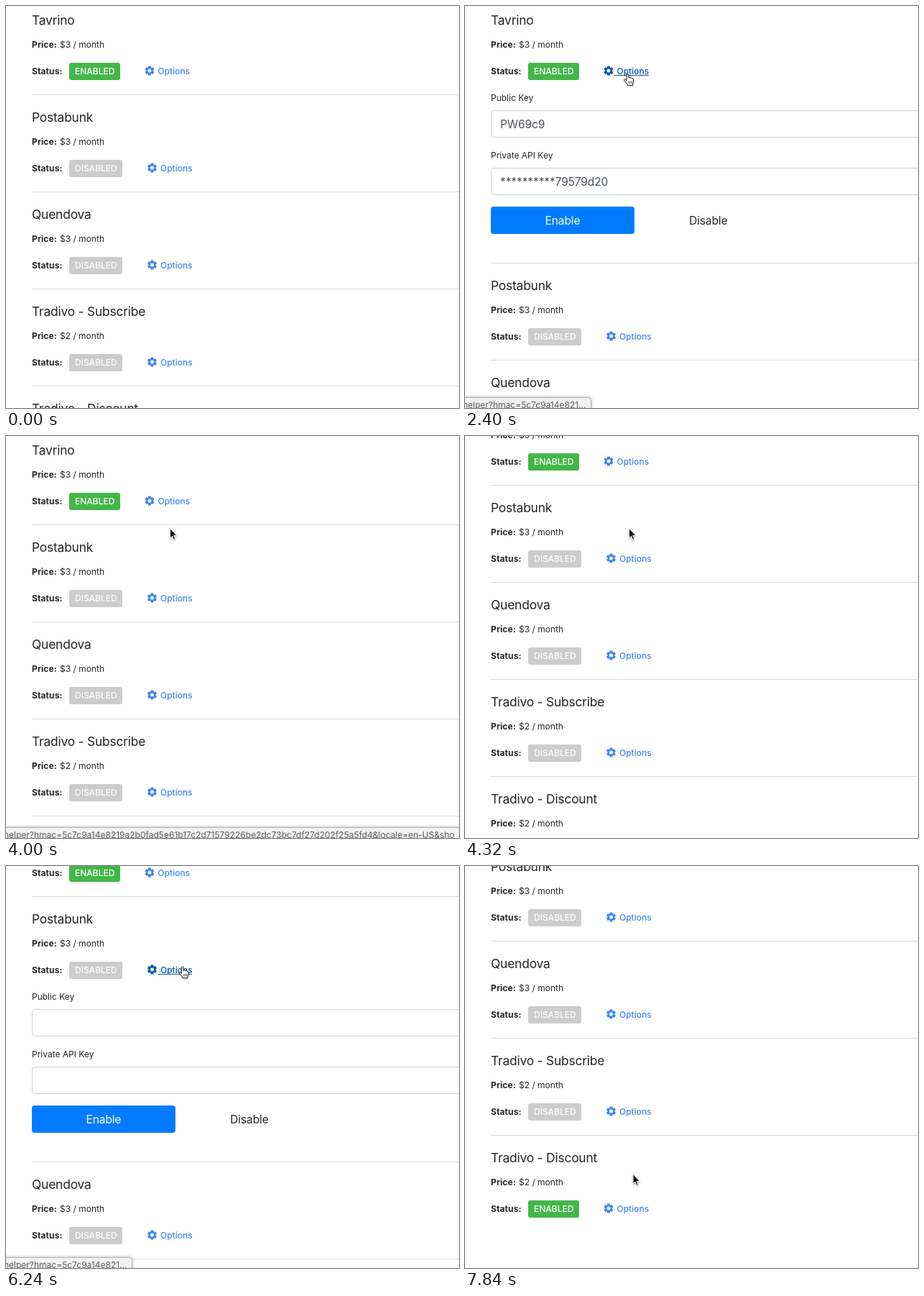
An HTML page that plays this animation: 631 by 559 pixels, repeating every 8 s.

```html
<!DOCTYPE html>
<html lang="en">
<head>
<meta charset="utf-8">
<style>
  html, body { margin: 0; width: 100%; height: 100%; overflow: hidden; background: #fff; }
  svg { display: block; width: 631px; height: 559px; font: 12px Inter, sans-serif; fill: #212529; }
  .title { font-size: 17.4px; letter-spacing: -.2px; }
  .bold { font-weight: 700; letter-spacing: .1px; }
  .badge { font-weight: 500; fill: #fff; }
  .link { font-weight: 500; fill: #4285f4; }
  .link.hover { fill: #0056b3; }
  .field { fill: #fff; stroke: #ced0d4; }
  .big { font-size: 15.5px; letter-spacing: -.1px; }
  .value { fill: #495057; }
  .url { fill: #5a5c5f; }
</style>
</head>
<body>
<svg id="stage" viewBox="0 0 631 559"></svg>
<script>
const LOOP = 8000, STEP = 160, ROW = 135, PANEL = 234;
const stage = document.getElementById('stage');

const rows = [
  { name: 'Tavrino', price: 3, on: true, keys: ['PW69c9', '**********79579d20'] },
  { name: 'Postabunk', price: 3, keys: ['', ''] },
  { name: 'Quendova', price: 3 },
  { name: 'Tradivo - Subscribe', price: 2 },
  { name: 'Tradivo - Discount', price: 2, on: true }
];
const url = 'helper?hmac=5c7c9a14e8219a2b0fad5e61b17c2d71579226be2dc73bc7df27d202f25a5fd4&locale=en-US&sho';

// Each track holds [start time, value...] and keeps a value until the next one.
const tracks = {
  cursor: [
    [0, ''], [160, 'arrow', 347, 379], [320, 'arrow', 327, 305.5], [640, 'arrow', 298, 243],
    [800, 'arrow', 250, 150], [960, 'arrow', 222, 100], [1280, 'hand', 221, 97],
    [1600, 'hand', 219.5, 95], [2240, 'hand', 221, 93.5], [3840, 'arrow', 228, 114],
    [4000, 'arrow', 228.5, 128.5], [4640, 'arrow', 228, 141], [4800, 'arrow', 228.5, 153],
    [5280, 'hand', 225.5, 149], [6080, 'hand', 205, 146], [6240, 'hand', 240.5, 139],
    [6400, 'hand', 235.5, 142], [7200, 'arrow', 240, 143], [7680, 'arrow', 238, 300],
    [7840, 'arrow', 234, 428.5]
  ],
  click: [[0, false], [2240, true], [2400, false], [3520, true], [3680, false],
          [5440, true], [5600, false], [6720, true], [6880, false]],
  hover: [[0, -1], [1920, 0], [3840, -1], [5280, 1], [7200, -1]],
  open: [[0, -1], [2400, 0], [3680, -1], [5600, 1], [6880, -1]],
  scroll: [[0, 0], [4160, 14], [4320, 55], [4480, 81], [7200, 118], [7360, 154]],
  status: [[0, ''], [2080, 'short'], [3680, 'long'], [4320, ''],
           [5600, 'short'], [6880, 'long'], [7680, '']]
};
const at = (track, t) => tracks[track].findLast(key => key[0] <= t).slice(1);

const text = (x, y, content, cls = '', extra = '') =>
  `<text x="${x}" y="${y}" class="${cls}" ${extra}>${content}</text>`;
const rect = (x, y, w, h, extra) =>
  `<rect x="${x}" y="${y}" width="${w}" height="${h}" ${extra}/>`;

function gear(x, y) {
  const teeth = [0, 60, 120].map(a => rect(-2, -6.5, 4, 13, `rx=".6" transform="rotate(${a})"`));
  return `<g transform="translate(${x} ${y})">${teeth.join('')}
    <circle r="4.9"/><circle r="2.5" fill="#fff"/></g>`;
}

function field(y, label, value) {
  return text(36, y, label) + rect(36.5, y + 13.5, 640, 37, 'rx="4" class="field"') +
    text(49, y + 38, value, 'big value');
}

function panel([publicKey, privateKey]) {
  return field(132, 'Public Key', publicKey) + field(212, 'Private API Key', privateKey) +
    rect(36, 279, 200, 38, 'rx="4" fill="#007bff"') +
    text(136, 304, 'Enable', 'big', 'text-anchor="middle" fill="#fff"') +
    text(339, 304, 'Disable', 'big', 'text-anchor="middle"');
}

function row({ name, price, on, keys }, y, open, hover, last) {
  const x = on ? 200 : 203.5, end = on ? 256 : 259;
  return `<g transform="translate(0 ${y})">` +
    text(36, 26, name, 'title') +
    text(36, 58, 'Price:', 'bold') + text(75, 58, `$${price} / month`) +
    text(36, 95, 'Status:', 'bold') +
    rect(88, 79, on ? 71 : 74, 24, `rx="3" fill="${on ? '#44b649' : '#ccc'}"`) +
    text(96, 95, on ? 'ENABLED' : 'DISABLED', 'badge') +
    `<g class="link ${hover ? 'hover' : ''}">` + gear(x, 90) + text(x + 11.5, 95, 'Options') +
    (hover ? rect(x + 8, 96, end - x - 8, 1, '') : '') + '</g>' +
    (open ? panel(keys) : '') +
    (last ? '' : rect(36, 123 + (open ? PANEL : 0), 595, 1, 'fill="#d9d9d9"')) + '</g>';
}

function statusBar(mode) {
  if (!mode) return '';
  const short = mode === 'short';
  return rect(-5.5, 544.5, short ? 181 : 650, 30,
    'rx="4" fill="#f2f2f2" stroke="#b4b4b4" style="filter:drop-shadow(0 0 2px #0005)"') +
    text(-3, 558.5, short ? url.slice(0, 24) + '...' : url, 'url');
}

const shapes = {
  '': '',
  arrow: `<path d="M0 0V13.5L3.1 10.7 5.2 15.8 7.4 14.8 5.3 9.9H9.5Z" fill="#111" stroke="#fff"
    style="filter:drop-shadow(0 1px 1px #0006)"/>`,
  hand: `<path d="M4 10.5V2.2a1.4 1.4 0 0 1 2.8 0V6.5q1.3-1 2.5.2q1.4-.7 2.3.5q1.9-.3 1.9 1.6v3
    q0 1.5-1 3v2H5.5v-1.5Q3 13.5 1 10q-.8-1.6.6-1.8q1.2 0 2.4 2.3z" fill="#fff" stroke="#222"
    style="filter:drop-shadow(0 1px 1px #0004)"/>
    <path d="M7.3 11v3.5M9.3 11v3.5M11.3 11v3.5" stroke="#222" stroke-width=".8"/>`
};

function draw(t) {
  const [shape, x = 0, y = 0] = at('cursor', t);
  const [open] = at('open', t), [hover] = at('hover', t), [scroll] = at('scroll', t);
  const list = rows.map((item, i) => row(item,
    i * ROW - scroll + (open >= 0 && i > open ? PANEL : 0),
    i === open, i === hover, i === rows.length - 1));
  const ring = at('click', t)[0]
    ? '<circle cx="7.5" cy="8" r="16.5" fill="#fff" fill-opacity=".6" stroke="#111"/>' : '';
  stage.innerHTML = list.join('') + statusBar(at('status', t)[0]) +
    `<g transform="translate(${x} ${y})">${ring}${shapes[shape]}</g>`;
}

let shown = -1;
function tick() {
  const step = Math.floor(performance.now() % LOOP / STEP);
  if (step !== shown) draw((shown = step) * STEP);
  requestAnimationFrame(tick);
}
tick();
</script>
</body>
</html>
```
